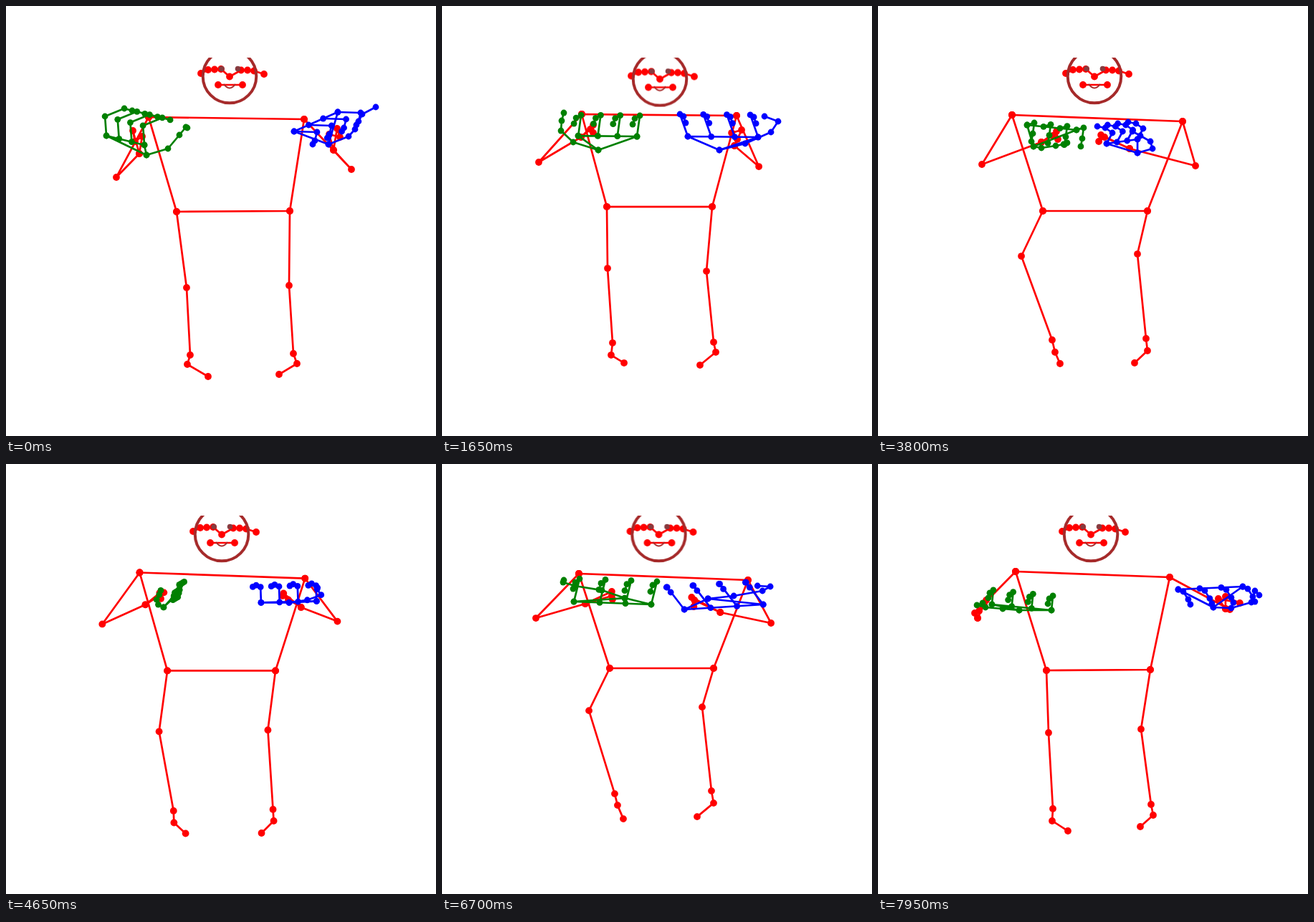
An HTML page without scripts that plays this animation: 600 px wide and 600 px high, repeating every 8 s.

```html
<!DOCTYPE html>
<html lang="en">
<head>
<meta charset="utf-8">
<title>Moving stick figure</title>
<style>
@property --x { syntax: "<length>"; inherits: true; initial-value: 0px; }
@property --y { syntax: "<length>"; inherits: true; initial-value: 0px; }
@property --u { syntax: "<length>"; inherits: true; initial-value: 0px; }
@property --v { syntax: "<length>"; inherits: true; initial-value: 0px; }

html, body { margin: 0; width: 100%; height: 100%; overflow: hidden; background: #fff; }
svg { display: block; width: 100%; height: 100%; }
path { fill: none; stroke-width: 2.7; stroke-linejoin: round; }
g, path { animation: 8s linear infinite; }
.body path { stroke: #f00; marker: url(#red); }
.left path { stroke: #008000; marker: url(#green); }
.right path { stroke: #00f; marker: url(#blue); }
.ring { fill: none; stroke: #a52a2a; stroke-width: 4; }
.eye { fill: #873b3f; }
.smile { stroke: #a52a2a; stroke-width: 2; }

.torso { animation-name: torso; }
.armL { animation-name: armL; }
.armR { animation-name: armR; }
.legL { animation-name: legL; }
.legR { animation-name: legR; }
.head { animation-name: head; }
.left { animation-name: rowL; }
.right { animation-name: rowR; }
.left .palm { animation-name: palmL; }
.right .palm { animation-name: palmR; }
.left .finger { animation-name: fingerL; }
.right .finger { animation-name: fingerR; }

/* fingers stand evenly along the knuckle row: start x y, step u v */
.finger {
  --n: 0;
  transform: translate(calc(var(--x) + var(--n) * var(--u)), calc(var(--y) + var(--n) * var(--v)));
}
.finger + .finger { --n: 1; }
.finger + .finger + .finger { --n: 2; }
.finger + .finger + .finger + .finger { --n: 3; }

@keyframes head {
  0% { transform: translate(312px, 98px); }
  20.6% { transform: translate(304px, 101.5px); }
  35% { transform: translate(303px, 99px); }
  47.5% { transform: translate(302px, 98px); }
  69.4% { transform: translate(300px, 98px); }
  83.8% { transform: translate(302.5px, 98px); }
  99.4%, to { transform: translate(297px, 98px); }
}
@keyframes torso {
  0% { d: path("M199 155 416 158 396 286 238 287Z"); }
  20.6% { d: path("M195 151 411 153 377 280 230 280Z"); }
  35% { d: path("M184 156 422 161 382 290 225 290Z"); }
  47.5% { d: path("M187 152 425 161 376 286 230 286Z"); }
  69.4% { d: path("M186 151 409 158 376 291 220 291Z"); }
  83.8% { d: path("M191 153 427 162 379 285 234 285Z"); }
  99.4%, to { d: path("M192 150 407 158 380 287 235 288Z"); }
}
/* hip, knee, ankle, heel, toe */
@keyframes legL {
  0% { d: path("M238 287 252 393 257 487 253 500 282 517"); }
  20.6% { d: path("M230 280 231 366 238 470 236 487 254 498"); }
  35% { d: path("M225 290 234 394 235 496 232 511 257 526"); }
  47.5% { d: path("M230 286 200 349 243 466 247 483 254 499"); }
  69.4% { d: path("M220 291 228 399 224 503 221 519 247 533"); }
  83.8% { d: path("M234 285 205 344 241 460 245 476 253 495"); }
  99.4%, to { d: path("M235 288 238 375 244 481 243 498 265 512"); }
}
@keyframes legR {
  0% { d: path("M396 286 395 390 401 485 406 499 381 514"); }
  20.6% { d: path("M377 280 369 370 379 469 382 483 360 501"); }
  35% { d: path("M382 290 376 395 380 496 383 511 357 529"); }
  47.5% { d: path("M376 286 362 346 374 464 376 481 358 498"); }
  69.4% { d: path("M376 291 369 398 371 501 371 516 355 533"); }
  83.8% { d: path("M379 285 363 339 376 456 379 473 356 492"); }
  99.4%, to { d: path("M380 287 367 370 381 475 384 490 366 506"); }
}
/* wrist, thumb, little finger, index, back to wrist, elbow, shoulder */
@keyframes armL {
  0% { d: path("M186 206 190 182 180 189 177 174ZL154 239 199 155"); }
  20.6% { d: path("M194 183 207 172 211 177 211 166ZL135 218 195 151"); }
  35% { d: path("M189 196 208 172 216 183 222 175ZL121 226 184 156"); }
  47.5% { d: path("M228 190 244 181 251 186 249 175ZL145 221 187 152"); }
  69.4% { d: path("M159 203 183 179 179 190 190 184ZL123 226 186 151"); }
  83.8% { d: path("M200 195 237 184 238 189 237 178ZL131 215 191 153"); }
  99.4%, to { d: path("M139 215 148 195 141 205 151 190ZL135 208 192 150"); }
}
@keyframes armR {
  0% { d: path("M457 201 451 179 466 183 462 171ZL482 228 416 158"); }
  20.6% { d: path("M408 195 412 186 404 177 418 173ZL442 224 411 153"); }
  35% { d: path("M432 204 421 182 435 187 434 176ZL474 246 422 161"); }
  47.5% { d: path("M351 199 316 183 308 189 311 180ZL443 223 425 161"); }
  69.4% { d: path("M476 201 460 185 485 190 468 181ZL483 216 409 158"); }
  83.8% { d: path("M388 207 352 190 351 199 348 186ZL459 222 427 162"); }
  99.4%, to { d: path("M485 202 475 188 505 194 485 185ZL491 203 407 158"); }
}
/* wrist, little knuckle, index knuckle, back to wrist, thumb */
@keyframes palmL {
  0% { d: path("M196 208 140 181 193 194ZL226 199 242 180 251 169 253 170"); }
  20.6% { d: path("M218 201 272 182 190 181ZL183 190 166 174 167 160 170 149"); }
  35% { d: path("M232 204 290 189 187 191ZL197 195 171 181 163 167 166 157"); }
  47.5% { d: path("M217 196 208 166 277 173ZL228 198 248 195 259 193 264 191"); }
  69.4% { d: path("M223 204 276 195 189 196ZL196 194 170 183 166 171 165 161"); }
  83.8% { d: path("M255 187 292 196 184 192ZL223 176 185 170 169 165 170 162"); }
  99.4%, to { d: path("M197 204 242 204 159 196ZL174 202 150 200 138 197 146 194"); }
}
@keyframes palmR {
  0% { d: path("M450 193 402 175 463 148ZL478 182 487 172 497 151 516 141"); }
  20.6% { d: path("M387 201 343 182 441 183ZL423 192 459 176 469 161 450 154"); }
  35% { d: path("M393 206 342 187 444 189ZL434 197 467 181 473 165 455 159"); }
  47.5% { d: path("M362 205 319 192 362 186ZL383 199 380 189 366 181 355 175"); }
  69.4% { d: path("M430 181 395 195 509 197ZL460 180 503 176 506 168 519 170"); }
  83.8% { d: path("M371 188 338 203 448 196ZL407 184 447 177 458 171 440 170"); }
  99.4%, to { d: path("M468 200 419 175 509 171ZL493 201 521 193 526 177 532 183"); }
}
@keyframes rowL {
  0% { --x: 140px; --y: 181px; --u: 17.7px; --v: 4.3px; }
  20.6% { --x: 272px; --y: 182px; --u: -27.3px; --v: -.3px; }
  35% { --x: 290px; --y: 189px; --u: -34.3px; --v: .7px; }
  47.5% { --x: 208px; --y: 166px; --u: 23px; --v: 2.3px; }
  69.4% { --x: 276px; --y: 195px; --u: -29px; --v: .3px; }
  83.8% { --x: 292px; --y: 196px; --u: -36px; --v: -1.3px; }
  99.4%, to { --x: 242px; --y: 204px; --u: -27.7px; --v: -2.7px; }
}
@keyframes rowR {
  0% { --x: 402px; --y: 175px; --u: 20.3px; --v: -9px; }
  20.6% { --x: 343px; --y: 182px; --u: 32.7px; --v: .3px; }
  35% { --x: 342px; --y: 187px; --u: 34px; --v: .7px; }
  47.5% { --x: 319px; --y: 192px; --u: 14.3px; --v: -2px; }
  69.4% { --x: 395px; --y: 195px; --u: 38px; --v: .7px; }
  83.8% { --x: 338px; --y: 203px; --u: 36.7px; --v: -2.3px; }
  99.4%, to { --x: 419px; --y: 175px; --u: 30px; --v: -1.3px; }
}
@keyframes fingerL {
  0% { d: path("M0 0 -2 -27 25 -38 36 -35"); }
  20.6% { d: path("M0 0 4 -29 -3 -25 -6 -17"); }
  35% { d: path("M0 0 5 -33 -1 -28 -1 -18"); }
  47.5% { d: path("M0 0 10 -3 8 12 6 23"); }
  69.4% { d: path("M0 0 5 -29 -6 -22 -9 -13"); }
  83.8% { d: path("M0 0 8 -32 2 -27 -1 -18"); }
  99.4%, to { d: path("M0 0 2 -20 -3 -16 -5 -9"); }
}
@keyframes fingerR {
  0% { d: path("M0 0 32 1 29 13 26 18"); }
  20.6% { d: path("M0 0 -11 -31 -6 -28 -3 -19"); }
  35% { d: path("M0 0 -8 -32 0 -29 4 -18"); }
  47.5% { d: path("M0 0 8 -15 -2 -22 -13 -24"); }
  69.4% { d: path("M0 0 -10 -29 -12 -27 -10 -20"); }
  83.8% { d: path("M0 0 -24 -31 -25 -31 -19 -24"); }
  99.4%, to { d: path("M0 0 7 3 14 14 17 21"); }
}
</style>
</head>
<body>
<svg viewBox="0 0 600 600">
  <defs>
    <clipPath id="stage"><rect x="75" y="72" width="465" height="463"/></clipPath>
    <marker id="red" markerUnits="userSpaceOnUse" overflow="visible"><circle r="4.9" fill="#f00"/></marker>
    <marker id="green" markerUnits="userSpaceOnUse" overflow="visible"><circle r="4.4" fill="#008000"/></marker>
    <marker id="blue" markerUnits="userSpaceOnUse" overflow="visible"><circle r="4.4" fill="#00f"/></marker>
  </defs>
  <g clip-path="url(#stage)">
    <g class="body">
      <path class="torso"/>
      <path class="legL"/>
      <path class="legR"/>
      <path class="armL"/>
      <path class="armR"/>
      <g class="head">
        <path d="M-40-4-30-9-21-9.5-12-10 0 .5 16-8.5 25-8.5 34-7.5 48-3M-16 12H18"/>
      </g>
    </g>
    <g class="head">
      <circle class="ring" r="37.3"/>
      <circle class="eye" cx="-11" cy="-10.5" r="3.8"/>
      <circle class="eye" cx="11.5" cy="-10.5" r="3.8"/>
      <path class="smile" d="M-8 11Q0 22 8 11"/>
    </g>
    <g class="left">
      <path class="palm"/>
      <path class="finger"/>
      <path class="finger"/>
      <path class="finger"/>
      <path class="finger"/>
    </g>
    <g class="right">
      <path class="palm"/>
      <path class="finger"/>
      <path class="finger"/>
      <path class="finger"/>
      <path class="finger"/>
    </g>
  </g>
</svg>
</body>
</html>
```
